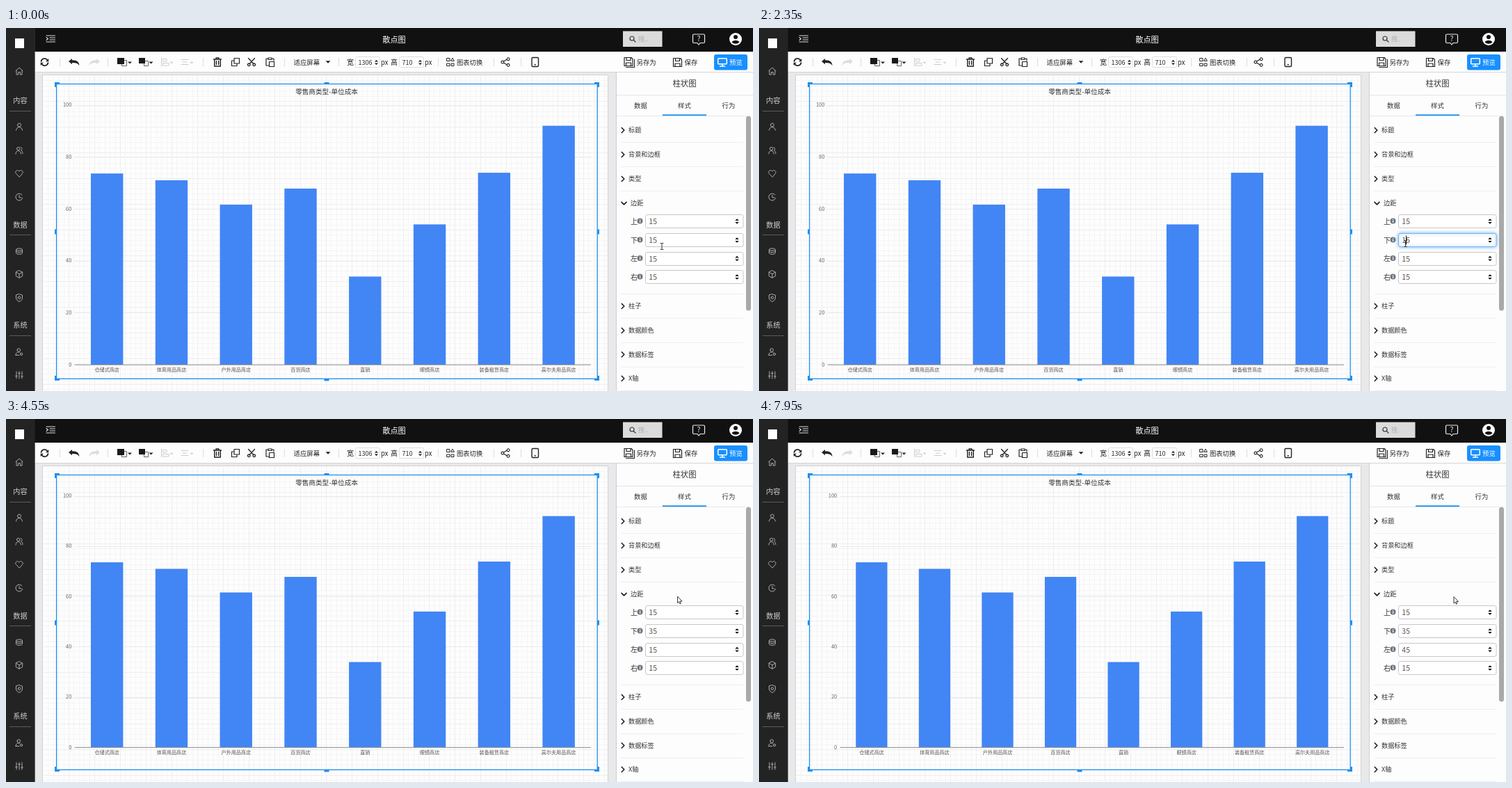
Animation of 1074x522 px, one loop 8000 ms. Source, as an HTML page with a canvas:

```html
<!DOCTYPE html>
<html lang="zh-CN">
<head>
<meta charset="utf-8">
<title>散点图</title>
<style>
html, body { margin: 0; width: 100%; height: 100%; overflow: hidden; background: #fff; }
canvas { display: block; width: 1074px; height: 522px; }
</style>
</head>
<body>
<canvas id="stage"></canvas>
<script>
const W = 1074, H = 522, LOOP = 8000;
const FONT = '"Noto Sans CJK SC", "Noto Sans CJK", "Noto Sans", sans-serif';
const BLUE = '#1e8ff0', INK = '#222', PALE = '#ccc';
const canvas = document.getElementById('stage');
const dpr = window.devicePixelRatio || 1;
canvas.width = W * dpr;
canvas.height = H * dpr;
const screen = canvas.getContext('2d');
const backdrop = document.createElement('canvas');
backdrop.width = canvas.width;
backdrop.height = canvas.height;
let c = backdrop.getContext('2d');
for (const ctx of [screen, c]) ctx.scale(dpr, dpr);

// ---- helpers
function rect(x, y, w, h, color) {
  c.fillStyle = color;
  c.fillRect(x, y, w, h);
}
function box(x, y, w, h, r, fill, stroke, lw = 1) {
  c.beginPath();
  c.roundRect(x, y, w, h, r);
  if (fill) { c.fillStyle = fill; c.fill(); }
  if (stroke) { c.strokeStyle = stroke; c.lineWidth = lw; c.stroke(); }
}
function disc(x, y, r, fill) {
  c.beginPath();
  c.arc(x, y, r, 0, Math.PI * 2);
  c.fillStyle = fill;
  c.fill();
}
function text(s, x, y, size, color = INK, align = 'left', weight = 400) {
  c.font = `${weight} ${size}px ${FONT}`;
  c.fillStyle = color;
  c.textAlign = align;
  c.textBaseline = 'middle';
  c.fillText(s, x, y);
}
// SVG path placed around x, y
function icon(x, y, d, color = INK, lw = 1.2, fill = false) {
  const p = new Path2D(d);
  c.save();
  c.translate(x, y);
  c.lineCap = c.lineJoin = 'round';
  c.strokeStyle = c.fillStyle = color;
  c.lineWidth = lw;
  if (fill) c.fill(p);
  if (lw) c.stroke(p);
  c.restore();
}
const caretDown = (x, y, s = 3, color = INK) =>
  icon(x, y, `M${-s} ${-s / 2}H${s}L0 ${s / 2}Z`, color, 0, true);
const spinner = (x, y, s = 2.8) =>
  icon(x, y, `M${-s} -1H${s}L0 ${-1 - s}ZM${-s} 1H${s}L0 ${1 + s}Z`, '#111', 0, true);

// ---- fixed parts
function sidebar() {
  rect(0, 0, 41.5, H, '#232323');
  box(13, 15, 13, 14, 0, '#fff');
  const tone = '#acacac';
  for (const [s, y, line] of [['内容', 104, 119], ['数据', 283, 297], ['系统', 427, 442]]) {
    text(s, 20.5, y, 10.2, '#cfcfcf', 'center');
    rect(5, line, 31, 1, '#5c5c5c');
  }
  const icons = [
    [62, 'M-5 -.5L0 -5L5 -.5M-4 -1V5H-1.3V1.5H1.3V5H4V-1'],
    [142, 'M-2.5 -2.5a2.5 2.5 0 1 0 5 0a2.5 2.5 0 1 0 -5 0M-4.5 5C-4 -1 4 -1 4.5 5'],
    [176, 'M-3.5 -2.5a2.2 2.2 0 1 0 4.4 0a2.2 2.2 0 1 0 -4.4 0M-5 5C-5 -1 2 -1 2.5 5M2 -4.5C5 -4 4 0 2.5 0C4 .5 5 2 5 4.5'],
    [209, 'M0 5L-4.6 .3C-7 -3 -2 -6.5 0 -2.8C2 -6.5 7 -3 4.6 .3Z'],
    [243, 'M4 -3A5 5 0 1 0 4.8 1.5M0 -2.5V.8H3'],
    [321, 'M-4.5 -2.5a4.5 1.6 0 1 0 9 0a4.5 1.6 0 1 0 -9 0V2.7a4.5 1.6 0 0 0 9 0V-2.5M-4.5 0a4.5 1.6 0 0 0 9 0'],
    [354, 'M0 -5.3L4.7 -2.8V2.7L0 5.3L-4.7 2.7V-2.8ZM-4.7 -2.8L0 -.3L4.7 -2.8M0 -.3V5.3'],
    [388, 'M0 -5.3L4.5 -3.8V0C4.5 3 2 4.5 0 5.5C-2 4.5 -4.5 3 -4.5 0V-3.8ZM-1.8 -.3a1.8 1.8 0 1 0 3.6 0a1.8 1.8 0 1 0 -3.6 0'],
    [466, 'M-3 -2.8a2.3 2.3 0 1 0 4.6 0a2.3 2.3 0 1 0 -4.6 0M-5 4.5C-5 -.5 0 -.5 1 .5M-5 4.5H0M1.5 3a1.6 1.6 0 1 0 3.2 0a1.6 1.6 0 1 0 -3.2 0'],
    [499, 'M-4 -5V5M0 -5V5M4 -5V5M-5.3 1.5H-2.7M-1.3 -2.5H1.3M2.7 2H5.3']
  ];
  for (const [y, d] of icons) icon(19, y, d, tone, 1);
}

function header() {
  rect(41.5, 0, W, 34, '#111');
  icon(64, 15.5, 'M-6 -4.5H6.5M-1 -1.5H6.5M-1 1.5H6.5M-6 4.5H6.5M-6 -2L-3.5 0L-6 2', '#ddd', 1.1);
  text('散点图', 558, 16.5, 11.2, '#fff', 'center', 500);
  rect(887, 4.5, 56.5, 22.5, '#dbdbdb');
  icon(901, 16, 'M-4 -1a3 3 0 1 0 6 0a3 3 0 1 0 -6 0M1.3 1.3L4 4', '#333', 1.2);
  text('搜..', 909, 16, 9, '#b0b0b0');
  icon(996, 16, 'M-7 -7H7Q8.5 -7 8.5 -5.5V4Q8.5 5.5 7 5.5H2L0 8L-2 5.5H-7Q-8.5 5.5 -8.5 4V-5.5Q-8.5 -7 -7 -7Z', '#eee', 1.2);
  text('?', 996, 15.5, 10.5, '#eee', 'center');
  disc(1049, 16, 9, '#fff');
  disc(1049, 13, 3, '#111');
  icon(1049, 16, 'M-5.5 4.5C-4 .8 4 .8 5.5 4.5Q0 9 -5.5 4.5Z', '#111', 0, true);
}

function toolbar() {
  rect(41.5, 34, W, 30, '#fdfdfd');
  rect(41.5, 63, W, 1, '#d5d5d5');
  for (const x of [77, 146, 283, 400, 478, 621, 701, 740]) rect(x, 43, 1, 12, '#ddd');
  icon(55.5, 49, 'M-5 -1A5 5 0 0 1 4 -3M5 1A5 5 0 0 1 -4 3', INK, 1.7);
  icon(55.5, 49, 'M5.8 -5V-.8H1.6ZM-5.8 5V.8H-1.6Z', INK, 0, true);
  const undo = 'M-8 -1L-3 -5V-2.6C4 -3 7 0 7.5 5C5 1.5 2 .8 -3 1V3.3Z';
  icon(98, 49, undo, INK, 0, true);
  c.save();
  c.translate(127, 49);
  c.scale(-1, 1);
  icon(0, 0, undo, '#ddd', 0, true);
  c.restore();
  box(166.5, 46.5, 7, 8, 0, '#fff', '#666');
  rect(160, 43, 10, 9, '#1a1a1a');
  box(198.5, 47.5, 6, 7, 0, '#fff', '#666');
  rect(191, 43, 9, 8, '#1a1a1a');
  caretDown(178, 50);
  caretDown(208.5, 50);
  icon(229, 49, 'M-5.5 -6V6M-3 -4.5H2V-1H-3ZM-3 1.5H5V5H-3Z', PALE, 1);
  icon(257, 49, 'M-5 -3.5H5M-3 0H3M-5 3.5H5', PALE, 1);
  caretDown(238, 50, 2.6, PALE);
  caretDown(267, 50, 2.6, PALE);
  icon(304, 49, 'M-5.5 -4H5.5M-2 -4V-6H2V-4M-4.3 -4V6H4.3V-4M-1.6 -1.5V3.5M1.6 -1.5V3.5', INK, 1.4);
  icon(330, 49, 'M-2 -5.5H5.5V2H-2ZM-2 -2H-5.5V5.5H2V2', INK, 1.2);
  icon(353, 49, 'M-4.5 -5.5L3 2.5M4.5 -5.5L-3 2.5M-5.5 3.8a1.8 1.8 0 1 0 3.6 0a1.8 1.8 0 1 0 -3.6 0M1.9 3.8a1.8 1.8 0 1 0 3.6 0a1.8 1.8 0 1 0 -3.6 0', INK, 1.3);
  icon(379.5, 49, 'M-2 5H-5.5V-5H-3.5M3.5 -5H5.5V-2M-2.5 -6H2.5V-3.5H-2.5ZM-1 -.5H6V6.5H-1Z', INK, 1.2);
  text('适应屏幕', 413.5, 49, 9.4);
  caretDown(463, 49, 3.4);
  for (const [label, x, value] of [['宽', 490, '1306'], ['高', 553, '710']]) {
    text(label, x, 49, 10);
    box(x + 12.5, 41.5, 35, 15, 2, '#fff', '#ddd');
    text(value, x + 16.5, 49.3, 9);
    spinner(x + 42.5, 49.5, 2.6);
    text('px', x + 49, 49, 9.4);
  }
  icon(639, 49, 'M-5 -5.5H-1V-1.5H-5ZM3.2 -5.5L5.4 -1.7H1ZM-5 2H-1V5.5H-5ZM1.5 2H5V5.5H1.5Z', INK, 1);
  text('图表切换', 648, 49, 9.3);
  icon(718, 49, 'M-2.5 -1L2.5 -4M-2.5 1L2.5 4M-6 0a1.9 1.9 0 1 0 3.8 0a1.9 1.9 0 1 0 -3.8 0M2.2 -4.3a1.9 1.9 0 1 0 3.8 0a1.9 1.9 0 1 0 -3.8 0M2.2 4.3a1.9 1.9 0 1 0 3.8 0a1.9 1.9 0 1 0 -3.8 0', INK, 1.1);
  box(756, 42.5, 9.5, 13, 1.5, null, INK, 1.4);
  disc(760.7, 52.7, 1, INK);
  const floppy = 'M-6 -6H4L6 -4V6H-6ZM-3 -6V-2H3V-6M-3.5 6V1.5H3.5V6';
  icon(895, 48.5, floppy, INK, 1.2);
  icon(897.5, 51, 'M-6 5.5H6V-6', INK, 1.1);
  text('另存为', 906.5, 49.3, 9.4);
  icon(965.5, 49.5, floppy, INK, 1.2);
  text('保存', 975.5, 49.3, 9.4);
  box(1018, 38, 48, 22.5, 3, '#1890ff');
  box(1023.7, 43.7, 12.6, 8, 1, null, '#fff', 1.5);
  icon(1030, 54.5, 'M0 -2V0M-3.5 .5H3.5', '#fff', 1.5);
  text('预览', 1040, 49.3, 9.4, '#fff');
}

function paper() {
  rect(41.5, 64, 836, H, '#e9e9eb');
  box(52.5, 67.5, 813, 470, 0, '#fdfdfd', '#d3d3d6');
  const step = 7.4;
  for (let i = 1; i * step < 812; i++) {
    const tone = i % 5 ? '#f5f5f6' : '#eeeef0';
    rect(Math.round(53 + i * step), 68, 1, H - 68, tone);
    if (i * step < 454) rect(53, Math.round(68 + i * step), 812, 1, tone);
  }
}

function panel() {
  rect(877, 64, 197, H, '#fdfdfd');
  rect(877, 64, 1, H, '#cfcfcf');
  text('柱状图', 975.5, 80, 11.4, '#333', 'center');
  rect(878, 96, 196, 1, '#e3e3e3');
  text('数据', 912.5, 111.3, 9.4, '#333', 'center');
  text('样式', 975.5, 111.3, 9.4, '#333', 'center');
  text('行为', 1039, 111.3, 9.4, '#333', 'center');
  rect(878, 126, 186, 1, '#e8e8e8');
  rect(944, 124.3, 63, 1.8, BLUE);
  box(1064, 126.5, 7, 280, 3.5, '#a9a9a9');
  const sections = [['标题', 147], ['背景和边框', 182], ['类型', 217], ['柱子', 400], ['数据颜色', 435], ['数据标签', 469.5], ['X轴', 504]];
  for (const [s, y] of sections) {
    icon(887, y, 'M-1.7 -3.5L1.8 0L-1.7 3.5', INK, 1.7);
    text(s, 895, y, 9.2, '#333');
    rect(884, Math.round(y + 17), 176, 1, '#efefef');
  }
  rect(884, 382, 176, 1, '#efefef');
  icon(888.5, 252, 'M-3.5 -1.7L0 1.8L3.5 -1.7', INK, 1.7);
  text('边距', 898, 252, 9.2, '#333');
}

// ---- chart
const BARS = [
  ['仓储式商店', 73.6], ['体育用品商店', 71], ['户外用品商店', 61.6], ['百货商店', 67.8],
  ['直销', 33.9], ['眼镜商店', 54], ['装备租赁商店', 73.9], ['高尔夫用品商店', 92]
];
const RIGHT = 841, TOP = 110.7;

function chart(left, base) {
  const slot = (RIGHT - left) / BARS.length;
  const yOf = v => base - (base - TOP) * v / 100;
  for (let v = 0; v <= 100; v += 20) {
    const y = yOf(v);
    if (v) rect(left, Math.round(y), RIGHT - left, 1, '#e9ebf0');
    text(String(v), left - 4.5, y - .3, 7.4, '#666', 'right');
  }
  BARS.forEach(([name, v], i) => {
    const mid = left + slot * (i + .5), y = yOf(v);
    rect(mid - slot / 4, y, slot / 2, base - y, '#4285f4');
    text(name, mid, base + 7.6, 7.1, '#555', 'center');
  });
  rect(left, Math.round(base) - .2, RIGHT - left, 1, '#8a8a8a');
  text('零售商类型-单位成本', 461, 91.7, 9.6, '#333', 'center');
}

function frame() {
  c.strokeStyle = BLUE;
  c.lineWidth = 1.3;
  c.strokeRect(72.6, 80.5, 777.6, 423.9);
  for (const [x, y, sx, sy] of [[70, 78, 1, 1], [853, 78, -1, 1], [70, 507, 1, -1], [853, 507, -1, -1]]) {
    rect(x, y, 7 * sx, 3 * sy, BLUE);
    rect(x, y, 3 * sx, 7 * sy, BLUE);
  }
  rect(457.5, 78, 7, 3, BLUE);
  rect(457.5, 504.5, 7, 3, BLUE);
  rect(70, 289.5, 3, 7, BLUE);
  rect(850, 289.5, 3, 7, BLUE);
}

// ---- margin fields and pointer
const ROWS = [['上', 278], ['下', 305], ['左', 331.5], ['右', 358]];
// time, focused row, its text, caret index
const EDITS = [
  [950, 1, '15', 2], [2150, 1, '15', 1], [2750, 1, '5', 0], [3100, 1, '35', 1], [4150, -1],
  [6050, 2, '15', 1], [6500, 2, '5', 0], [6850, 2, '45', 1], [7800, -1]
];
// time, x, y
const PATH = [
  [0, 943, 314], [200, 943, 314], [750, 943.5, 308], [1500, 943.5, 308], [2050, 929.5, 310],
  [3450, 929.5, 310], [4050, 965.5, 255.5], [4700, 965.5, 255.5], [5350, 935.5, 335],
  [5600, 935.5, 335], [5950, 930, 336], [7000, 930, 336], [7650, 999, 256], [8000, 999, 256]
];

function fields(t) {
  const values = ['15', '15', '15', '15'];
  let now = null;
  for (const e of EDITS) {
    if (e[0] > t) break;
    now = e;
    if (e[1] >= 0) values[e[1]] = e[2];
  }
  ROWS.forEach(([label, y], i) => {
    const focus = now && now[1] === i;
    text(label, 898, y, 10, '#333');
    disc(911.5, y - .5, 4, '#6d7986');
    rect(911, y - 1.2, 1.2, 3, '#fff');
    rect(911, y - 3, 1.2, 1.1, '#fff');
    c.save();
    if (focus) { c.shadowColor = 'rgba(70,160,240,.75)'; c.shadowBlur = 5 * dpr; }
    box(919.5, Math.round(y) - 9.5, 140.5, 19, 2.5, '#fff', focus ? '#72b6f0' : '#c8c8c8');
    c.restore();
    text(values[i], 924.3, y + .4, 10.5, '#555');
    if (focus && (t - now[0]) % 1060 < 530) {
      const x = 924.3 + c.measureText(values[i].slice(0, now[3])).width;
      rect(Math.round(x), y - 6.5, 1, 13, '#111');
    }
    spinner(1051, y);
  });
}

function pointer(t) {
  const i = PATH.findIndex(p => p[0] > t);
  const [t0, x0, y0] = PATH[i - 1], [t1, x1, y1] = PATH[i];
  const k = (t - t0) / (t1 - t0), e = k * k * (3 - 2 * k);
  const x = x0 + (x1 - x0) * e, y = y0 + (y1 - y0) * e;
  if (ROWS.some(r => Math.abs(r[1] - y) < 10)) {
    icon(x, y, 'M-2 -4.5H-.6L0 -4L.6 -4.5H2M0 -4V4M-2 4.5H-.6L0 4L.6 4.5H2', '#222', .9);
  } else {
    const arrow = 'M0 0V9L2 7.2L3.4 10.3L4.9 9.6L3.5 6.6H6.2Z';
    icon(x, y, arrow, '#fff', 0, true);
    icon(x, y, arrow, '#222', .9);
  }
}

// eased step after a margin is committed
function shift(t, at) {
  const k = Math.min(1, Math.max(0, (t - at) / 130));
  return 1 - (1 - k) ** 3;
}

paper();
panel();
header();
toolbar();
sidebar();
c = screen;

const start = performance.now();
function draw() {
  const t = Math.max(0, performance.now() - start) % LOOP;
  c.drawImage(backdrop, 0, 0, W, H);
  chart(98.8 + 17.8 * shift(t, 7800), 484 - 12 * shift(t, 4150));
  frame();
  fields(t);
  pointer(t);
  requestAnimationFrame(draw);
}
draw();
</script>
</body>
</html>
```
